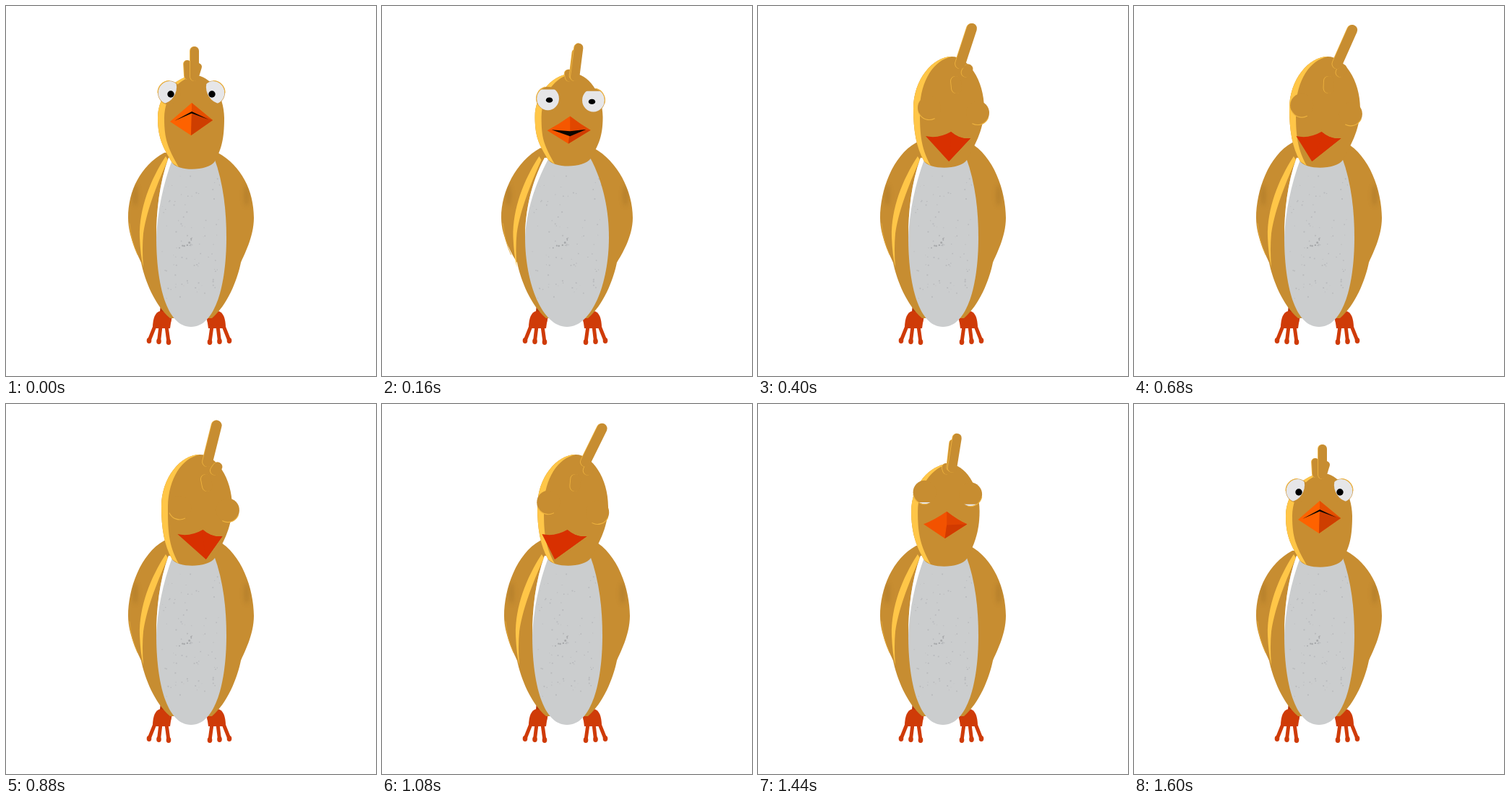
An HTML page with a canvas that plays this animation: 512 px wide and 512 px high, repeating every 1.64 s.

```html
<!DOCTYPE html>
<html>
<head>
<meta charset="utf-8">
<style>
html, body { margin: 0; width: 100%; height: 100%; overflow: hidden; background: #fff; }
canvas { display: block; }
</style>
</head>
<body>
<canvas id="stage" width="512" height="512"></canvas>
<script>
const ctx = document.getElementById('stage').getContext('2d');
const LOOP = 1640;
const GOLD = '#c78d31', YELLOW = '#ffc648', RIM = '#eeb33f', FOOT = '#cf3b08';

// lift raises the head, tilt bows it, yaw shakes it, lid closes the eyes, gape opens the beak
const rest = { breath: 0, lift: 0, tilt: 0, yaw: 0, lid: 0, gape: 2.5 };
const gulp = { breath: 1, lift: 0.1, tilt: 0.32, yaw: 0, lid: 0.12, gape: 7 };
const bow = { breath: 0, lift: 1, tilt: 1, yaw: 0, lid: 1, gape: 0 };
const rise = { breath: 0, lift: 0.5, tilt: 0.42, yaw: 0, lid: 0.88, gape: 0 };

const keys = [[0, rest], [160, gulp], [400, bow], [480, { ...bow, yaw: -1.5 }]];
for (let i = 0; i < 5; i++) keys.push([600 + 144 * i, { ...bow, yaw: i % 2 ? -1.5 : 0.5 }]);
keys.push([1440, rise], [1600, rest], [LOOP, rest]);

// Cubic motion through the keys, standing still at turning points
function poseAt(t) {
  const i = keys.findIndex(k => k[0] > t) - 1;
  const at = n => keys[Math.max(0, Math.min(keys.length - 1, n))];
  const [[t0, a], [t1, b], [t2, c], [t3, d]] = [-1, 0, 1, 2].map(n => at(i + n));
  const span = t2 - t1, u = (t - t1) / span, v = 1 - u;
  const slope = (p, q, r, time) => (q - p) * (r - q) > 0 ? (r - p) / time * span : 0;
  return Object.fromEntries(Object.keys(rest).map(k => [k,
    b[k] * v * v * (1 + 2 * u) + c[k] * u * u * (3 - 2 * u)
    + slope(a[k], b[k], c[k], t2 - t0) * u * v * v
    - slope(b[k], c[k], d[k], t3 - t1) * u * u * v]));
}

function fill(d, color) {
  ctx.fillStyle = color;
  ctx.fill(new Path2D(d));
}

function stroke(d, color, width) {
  ctx.strokeStyle = color;
  ctx.lineWidth = width;
  ctx.stroke(new Path2D(d));
}

function ellipsePath(x, y, rx, ry, from = 0, to = 2 * Math.PI) {
  ctx.beginPath();
  ctx.ellipse(x, y, Math.max(0, rx), Math.max(0, ry), 0, from, to);
}

function ellipse(x, y, rx, ry, color) {
  ellipsePath(x, y, rx, ry);
  ctx.fillStyle = color;
  ctx.fill();
}

function bothSides(axis, drawSide) {
  drawSide();
  ctx.save();
  ctx.translate(2 * axis, 0);
  ctx.scale(-1, 1);
  drawSide();
  ctx.restore();
}

let seed = 7;
const random = () => (seed = seed * 16807 % 2147483647) / 2147483647;
const specks = Array.from({ length: 100 }, (_, i) => i < 8
  ? { x: -16 + random() * 20, y: 320 + random() * 16, r: 0.6 + random() * 0.9, alpha: 0.4 }
  : { x: -40 + random() * 80, y: 235 + random() * 170, r: 0.4 + random() * 0.7, alpha: 0.2 });

function drawFoot() {
  fill('M214 412L231 425L228 438L212 434Z', '#b53207');
  fill('M203 446Q203 424 214 422Q227 424 229 432L227 446Z', FOOT);
  for (let i = 0; i < 3; i++) {
    const x = 198 + 13.5 * i, y = 463 + i;
    stroke(`M${206 + 8 * i} 443L${x} ${y}`, FOOT, 5);
    ellipse(x, y, 3.3, 4, FOOT);
  }
}

function drawWing(breath, shoulder) {
  const edge = 169 - 4 * breath;
  const wing = `M219 ${shoulder}C186 ${shoulder + 18} ${edge} 256 ${edge} 293
    C${edge} 320 ${183 - 2 * breath} 345 187 355C192 380 206 414 227 432H258V${shoulder}Z`;
  fill(wing, GOLD);
  ctx.save();
  ctx.clip(new Path2D(wing));
  ctx.filter = 'blur(3px)';
  ellipse(edge + 10, 262, 3, 15, 'rgba(100,65,15,.2)');
  ctx.restore();
}

function drawBody(breath, shoulder) {
  bothSides(256, () => drawWing(breath, shoulder));
  ctx.save();
  ctx.translate(-3.5 * breath, 0);
  fill('M221 208C200 240 184 280 185 320Q186 345 190 362Q188 335 190 315C195 280 212 240 224 213Z', YELLOW);
  stroke('M171 301Q173 325 182 344', '#e2a738', 0.9);
  ctx.restore();

  const l = 208 - 10 * breath, r = 305 + 9 * breath, bulge = 6 * breath;
  const flank = `M225 210C${212 - bulge} 245 ${l} 285 ${l} 320`;
  fill(`${flank}C${l} 385 222 444 256 444C290 444 ${r} 385 ${r} 320
    C${r} 285 ${301 + bulge} 245 288 210Z`, '#cbcdce');
  fill(`${flank}C${l + 2} 285 ${216 - bulge} 250 231 210Z`, '#fff');
  for (const { x, y, r, alpha } of specks)
    ellipse(256 + x * (1 + 0.2 * breath), y, r, r, `rgba(110,112,118,${alpha})`);
}

function drawHead({ tilt, lift, breath }, top) {
  const l = 210 + 5 * tilt, r = 302 + 11 * tilt, x = 262 + 6 * tilt;
  const mid = 155 - 13 * lift, low = mid + 30, up = mid - (mid - top) * 0.55;
  const chin = 226 - 4 * breath - 2 * lift;
  const side = `M${x} ${top}C${(x + l) / 2} ${top} ${l} ${up} ${l} ${mid}
    C${l} ${low} 219 ${chin - 28} 230 ${chin - 9}`;
  fill(`${side}C238 ${chin + 3} 280 ${chin + 3} 289 ${chin - 11}
    C298 ${chin - 28} ${r} ${low} ${r} ${mid}C${r} ${up} ${(x + r) / 2} ${top} ${x} ${top}Z`, GOLD);
  fill(`${side}L239 ${chin - 3}C224 ${chin - 30} ${l + 9} ${low} ${l + 9} ${mid}
    C${l + 10} ${up} ${(x + l) / 2 + 2} ${top + 5} ${x} ${top}Z`, YELLOW);
}

function drawTuft(x, y, tipX, tipY, width) {
  stroke(`M${x - 0.9} ${y}L${tipX - 0.9} ${tipY}`, RIM, width);
  stroke(`M${x} ${y}L${tipX} ${tipY}`, GOLD, width);
}

function drawTufts({ tilt, yaw }, top) {
  const sink = tilt * tilt;
  const swing = 29 * sink - 90 * tilt * (1 - tilt);
  drawTuft(252 + 23 * tilt + 8 * yaw, top + 1 + 43 * sink,
    251 + 23 * tilt + 6 * yaw, top - 16 + 50 * tilt, 10 + 4 * tilt);
  drawTuft(262 + 26 * sink + 3 * yaw, top + 1 + 21 * sink,
    266 + 25 * sink + 4 * yaw, top - 12 + swing, 10 + 3 * sink);
  drawTuft(261 + 19 * tilt - 2 * yaw, top + 2 + 8 * tilt,
    261 + 35 * tilt - 9 * yaw, top - 34 - 5 * tilt - 3 * yaw, 12 + 2 * sink);
}

// The white shows between the lid above and the cheek on the inner side
function drawEye(x, y, side, { tilt, lid }) {
  const size = 16, cheek = 8 + 25 * tilt;
  ctx.save();
  ctx.translate(x, y);
  ctx.scale(side, 1);
  ellipse(0, 0, size, size + 0.5, GOLD);
  ctx.save();
  ellipsePath(0, 0, size - 0.6, size);
  ctx.clip();
  ellipsePath(0.87 * (cheek - 24), 0.49 * (cheek - 24), 24, 24);
  ctx.clip();
  ctx.beginPath();
  ctx.rect(-20, -17 + 35 * lid, 40, 40);
  ctx.clip();
  ellipse(0, 0, 20, 20, '#e6e6e8');
  ellipse(2, 2, 4.7, 4.7 - 9 * lid, '#000');
  ctx.restore();
  const from = Math.PI * (1 - 0.65 * lid);
  ellipsePath(0, 0, size, size + 0.5, from, from + Math.PI / 2);
  ctx.strokeStyle = RIM;
  ctx.lineWidth = 1.1;
  ctx.stroke();
  ctx.restore();
}

function drawBeak({ tilt, yaw, gape }, top) {
  const sink = tilt ** 1.3, turn = 11 * yaw;
  const lx = 227 + 5 * tilt + turn, ly = top + 64 + 46 * tilt;
  const tx = 257 + 10 * tilt + turn, ty = top + 38 + 66 * tilt;
  const rx = 286 + 8 * tilt + turn, ry = top + 62 + 51 * tilt;
  const bx = 256 + 8 * sink + 26 * yaw, by = top + 83 + 62 * sink;
  const mx = tx, my = ly - 14 * Math.max(0, 1 - tilt / 0.3) + 3 * tilt;
  const shade = (r, g) => `rgb(${r + (216 - r) * sink},${g + (48 - g) * sink},0)`;
  const sag = 7 * sink;
  const topLeft = `Q${(lx + tx) / 2} ${(ly + ty) / 2 + sag} ${tx} ${ty}`;
  const topRight = `Q${(rx + tx) / 2} ${(ry + ty) / 2 + sag} ${rx} ${ry}`;
  fill(`M${lx} ${ly}${topLeft}${topRight}L${bx} ${by}Z`, shade(254, 98));
  fill(`M${tx} ${ty}${topRight}L${bx} ${by}L${mx} ${my}Z`, shade(228, 78));
  fill(`M${mx} ${my}L${rx} ${ry}L${bx} ${by}Z`, shade(206, 62));
  if (gape > 0.2)
    fill(`M${lx + 6} ${ly - 1}L${mx} ${my}L${rx - 6} ${ry - 1}L${mx} ${my + gape}Z`, '#0a0500');
}

function draw(t) {
  const pose = poseAt(t), { breath, lift, tilt, yaw } = pose;
  const top = 96 - 26 * lift;
  const eyeY = top + 24 + 47 * tilt ** 1.3;
  ctx.fillStyle = '#fff';
  ctx.fillRect(0, 0, 512, 512);
  ctx.lineCap = 'round';
  bothSides(253.5, drawFoot);
  drawBody(breath, 203 - 14 * lift - 5 * breath);
  drawHead(pose, top);
  drawTufts(pose, top);
  drawEye(226 + 11 * tilt + 7 * yaw, eyeY + 5 * yaw, 1, pose);
  drawEye(287 + 17 * tilt + 6 * yaw, eyeY + 7 * tilt - 2 * yaw, -1, pose);
  drawBeak(pose, top);
}

function frame() {
  draw(performance.now() % LOOP);
  requestAnimationFrame(frame);
}
frame();
</script>
</body>
</html>
```
